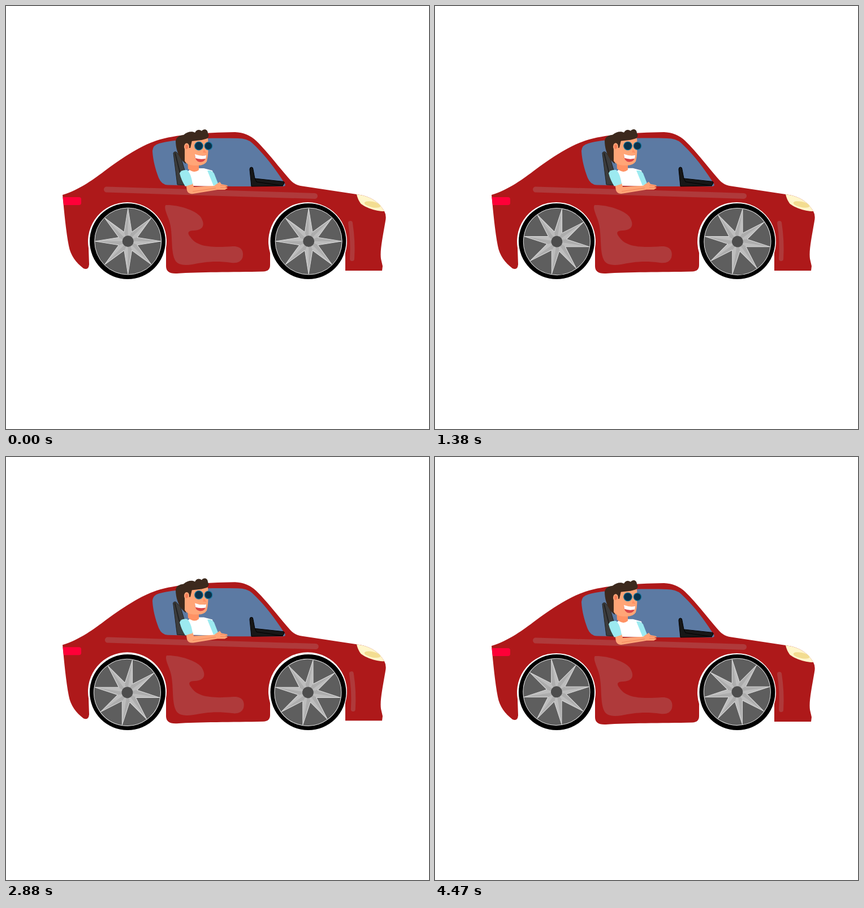
Recreate the animation shown at these times as an HTML page. Size 748 px wide and 748 px high, loop 4500 ms.

```html
<!DOCTYPE html>
<html lang="en">
<head>
<meta charset="utf-8">
<title>Red car</title>
<style>
  html, body { margin: 0; width: 100%; height: 100%; overflow: hidden; background: #fff; }
  svg { display: block; width: 100vw; height: 100vh; }
</style>
</head>
<body>
<svg viewBox="0 0 748 748">
  <defs>
    <g id="wheel">
      <circle r="59" fill="#5e5e5e" stroke="#e6e6e6"/>
      <g id="spokes" stroke-linejoin="round"></g>
      <circle r="10" fill="#4d4d4d"/>
    </g>
  </defs>

  <g id="body">
    <path fill="#ae191a" d="M100 334C130 325 157 305 178 289C204 270 236 248 266 238C300 227 350 224 405 223
      Q427 224 442 238C462 257 484 287 503 308Q511 317 524 318.500L620 333C645 336 661 348 669 363Q673 370 671 380
      C666 409 661 433 663 447L666 460L665 468H600V436.700A69.500 69.500 0 1 0 467 436.700V458Q467 469 455 469.500
      C400 471 340 470 302 473Q283 474 283 460V428.300A69.500 69.500 0 1 0 146 428.300L147 457Q146 468 137 464
      C124 454 114 441 111 424C106 398 103 365 100 334Z"/>
    <path fill="#ff0038" d="M100.500 338H129Q133 338 133 342V348Q133 352 129 352H102Z"/>
    <path fill="#fff6cb" d="M620 333C645 336 661 348 669 363C652 363 633 355 627 349Q622 342 620 333Z"/>
    <ellipse cx="648" cy="351" rx="14.500" ry="5" transform="rotate(12 648 351)" fill="#f3dd91"/>
    <path fill="#5c7aa3" d="M259 257Q259 246 271 243C305 234 360 233 410 234Q426 234 435 242
      C459 264 479 292 493 314Q496 319 489 319L400 319L286 316.500Q275 316 270 304C264 288 260 273 259 257Z"/>
    <path fill="#171717" stroke="#000" d="M431 289Q431 285 434 285Q437 285 437 289L440 305L491 310.500Q494 312 489 318L434 319Z"/>
    <path fill="none" stroke="#000" d="M440 305L443 311L490 318"/>
  </g>

  <g id="shine" fill="none" stroke="#af3a3b" stroke-linecap="round">
    <path stroke-width="10" d="M178 324.500L546 336"/>
    <path stroke-width="8" d="M609 384Q614 416 612 447"/>
  </g>
  <path id="door" fill="#af3a3b" d="M282 352C302 351 334 360 344 373C352 386 350 396 332 397Q316 397 326 409
    C337 425 360 428 400 425C416 424 421 434 418 445Q414 456 398 454C368 450 350 453 329 457
    Q303 461 298 448C290 430 296 398 287 376C283 365 279 356 282 352Z"/>

  <g id="seat">
    <path fill="#3d3d3d" stroke="#222" d="M296 260Q297 257 301 258L309 267L318 297V317L303 316Z"/>
    <path fill="none" stroke="#222" stroke-width="2" d="M299 260L309 300"/>
  </g>

  <g id="driver">
    <path fill="#fff" d="M322 292L328 287H350L365 291L371 319L327 318Z"/>
    <path fill="#9ceaf0" d="M356 291Q364 290 368 296L375 314L367 318Z"/>
    <path fill="#ff9264" d="M321 275H341V290Q333 297 322 288Z"/>
    <path fill="#3c291d" d="M318 279C306 271 300 254 300 238Q302 229 314 228C320 222 330 221 334 224
      C338 217 343 219 346 221C350 216 357 218 357 225Q361 231 354 235L323 255Z"/>
    <path fill="#ffa577" d="M316 252L325 249L328 239L346 237L357 234C358 247 358 265 355 275
      Q350 283 336 282Q320 282 316 274Z"/>
    <path fill="#3c291d" d="M314 238L330 232L346 229L357 228Q357 234 344 236L329 238L326 251L322 251L316 248Z"/>
    <ellipse cx="319.500" cy="249" rx="4.500" ry="6.500" fill="#ffa577"/>
    <ellipse cx="319.500" cy="249" rx="2.500" ry="4" fill="#f47d57"/>
    <path fill="#ff9164" d="M350 254L355 260L348 259Z"/>
    <path fill="#d84648" d="M334 263Q344 266 353 264Q354 276 343 276Q334 275 334 263Z"/>
    <path fill="#fff" d="M334 262Q344 266 354 264L353 270Q343 272 335 269Z"/>
    <g fill="#0b324a" stroke="#14759d" stroke-width="1.300">
      <circle cx="341" cy="247.500" r="7.300"/>
      <circle cx="358" cy="247.500" r="6.800"/>
    </g>
    <path fill="#ffa577" d="M318 314L330 313L332 320L368 318L378 311L381 315L391 317L392 319L388 320
      L392 322L387 325L374 325L331 332Q322 333 320 326Z"/>
    <path fill="none" stroke="#f0855a" d="M330 328L371 322M379 317L391 318M379 321L391 321"/>
    <path fill="#9ceaf0" d="M307 296Q309 289 320 290Q327 295 330 315L317 319Q310 308 307 296Z"/>
  </g>

  <g id="wheels"></g>
</svg>
<script>
  const FRAME = 30, LOOP = 4500, BOB = 450, TURN = 1200;
  const $ = id => document.getElementById(id);
  const NS = 'http://www.w3.org/2000/svg';

  const add = (parent, tag, attrs) => {
    const el = document.createElementNS(NS, tag);
    for (const key in attrs) el.setAttribute(key, attrs[key]);
    return parent.appendChild(el);
  };

  // Each spoke is a kite split into a dark and a light half.
  for (let i = 0; i < 8; i++) {
    const spoke = add($('spokes'), 'g', { transform: `rotate(${i * 45})` });
    add(spoke, 'path', { d: 'M0 0L-6.700 -16.200L0 -58L6.700 -16.200Z', fill: '#bdbdbd' });
    add(spoke, 'path', { d: 'M0 0L-6.700 -16.200L0 -58Z', fill: '#adadad' });
    add(spoke, 'path', { d: 'M-6.700 -16.200L0 -58L6.700 -16.200', fill: 'none', stroke: '#dcdcdc' });
  }

  // The rims sit slightly off their axles, so they wobble as they turn.
  const rims = [215, 534.5].map(x => {
    const axle = add($('wheels'), 'g', { transform: `translate(${x} 416)` });
    add(axle, 'circle', { r: 67, fill: '#000' });
    return add(axle, 'use', { href: '#wheel', x: 0.7 });
  });

  const shift = (id, x, y) => $(id).setAttribute('transform', `translate(${x} ${y})`);
  const wave = t => (1 - Math.cos(t / BOB * 2 * Math.PI)) / 2;

  function draw(time) {
    const t = Math.floor(time % LOOP / FRAME) * FRAME;
    const lift = wave(t);
    shift('body', 0, -1.9 * lift);
    shift('shine', 2 * lift, -lift);
    shift('door', 3 * wave(t - 45), -lift);
    shift('seat', -0.5 * lift, -2 * lift);
    shift('driver', 0, -4 * lift);
    for (const rim of rims) rim.setAttribute('transform', `rotate(${t / TURN * 360})`);
  }

  const start = performance.now();
  const tick = () => {
    draw(performance.now() - start);
    requestAnimationFrame(tick);
  };
  tick();
</script>
</body>
</html>
```
